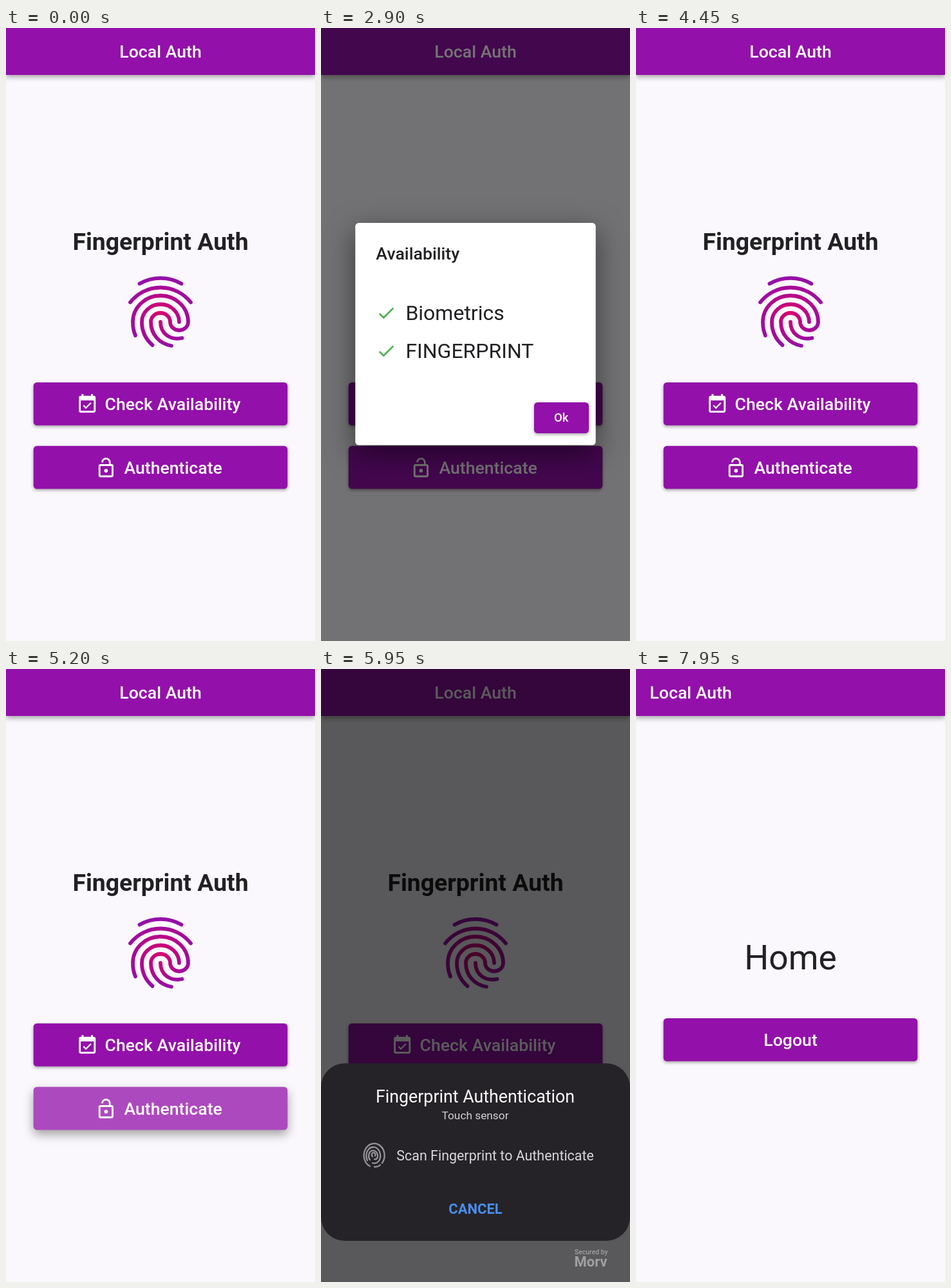
An HTML page with a canvas for the animation above (8 s loop, 480 by 953 pixels).

```html
<!DOCTYPE html>
<html lang="en">
<head>
<meta charset="utf-8">
<title>Local Auth</title>
<style>
  html, body { margin: 0; width: 100%; height: 100%; overflow: hidden; background: #faf8fc; }
  canvas { display: block; width: 480px; height: 953px; }
</style>
</head>
<body>
<canvas id="stage" width="480" height="953"></canvas>
<script>
const W = 480, H = 953, LOOP = 8000;
const PURPLE = '#9310aa', PAPER = '#faf8fc', INK = '#212023';
const stage = document.getElementById('stage').getContext('2d');
const buffer = Object.assign(document.createElement('canvas'), { width: W, height: H });
const bufferCtx = buffer.getContext('2d');
let ctx = stage;

const ICONS = {
  calendar: new Path2D('M16.53 11.06L15.47 10l-4.88 4.88-2.12-2.12-1.06 1.06L10.59 17l5.94-5.94zM19 3h-1V1h-2v2H8V1H6v2H5c-1.11 0-1.99.9-1.99 2L3 19c0 1.1.89 2 2 2h14c1.1 0 2-.9 2-2V5c0-1.1-.9-2-2-2zm0 16H5V8h14v11z'),
  lock: new Path2D('M12 17c1.1 0 2-.9 2-2s-.9-2-2-2-2 .9-2 2 .9 2 2 2zm6-9h-1V6c0-2.76-2.24-5-5-5S7 3.24 7 6h1.9c0-1.71 1.39-3.1 3.1-3.1s3.1 1.39 3.1 3.1v2H6c-1.1 0-2 .9-2 2v10c0 1.1.9 2 2 2h12c1.1 0 2-.9 2-2V10c0-1.1-.9-2-2-2zm0 12H6V10h12v10z'),
  check: new Path2D('M9 16.17L4.83 12l-1.42 1.41L9 19 21 7l-1.41-1.41z')
};

const FINGERPRINT = new Path2D(
  'M207.5 397.5A66 66 0 0 1 272.5 397.5 M193 426.5A59.5 59.5 0 0 1 287 426.5' +
  'M201 478C198 471 197 465 197 457A43 41 0 0 1 283 457A14 13 0 0 1 255 457' +
  'A15 14 0 0 0 225 457C225 477 239 491 257 494' +
  'M227.5 493C216 483 211 471 211 457A29 27.5 0 0 1 269 457' +
  'M240 457C240 475 255 486 273.5 482');

const SMALL_PRINT = new Path2D(
  'M95 768A16 18.5 0 1 0 76 773 M72 764A11 13.5 0 1 1 91 763Q87 770 80 768' +
  'M76 763A7 8.5 0 1 1 88 758Q87 763 83 762 M80 758A2.8 3.4 0 1 1 84 757 M83 774Q89 774 92 771');

const clamp = x => Math.min(1, Math.max(0, x));
const span = (t, start, length) => clamp((t - start) / length);

function bezier(x1, y1, x2, y2) {
  const at = (a, b, s) => 3 * a * s * (1 - s) ** 2 + 3 * b * s * s * (1 - s) + s ** 3;
  return x => {
    let lo = 0, hi = 1;
    for (let i = 0; i < 20; i++) {
      const mid = (lo + hi) / 2;
      if (at(x1, x2, mid) < x) lo = mid; else hi = mid;
    }
    return at(y1, y2, (lo + hi) / 2);
  };
}
const ease = bezier(0.25, 0.1, 0.25, 1);
const easeIn = bezier(0.42, 0, 1, 1);
const easeOut = bezier(0, 0, 0.58, 1);
const fastOutSlowIn = bezier(0.4, 0, 0.2, 1);

const press = (t, down, up) => span(t, down, 180) * (1 - span(t, up, 200));

function text(str, x, y, size, { weight = 400, color = '#fff', align = 'left' } = {}) {
  ctx.font = `${weight} ${size}px Roboto, sans-serif`;
  ctx.fillStyle = color;
  ctx.textAlign = align;
  ctx.fillText(str, x, y);
}

function box(x, y, w, h, r, color, shadow) {
  ctx.save();
  if (shadow) {
    ctx.shadowColor = `rgba(0,0,0,${shadow.alpha})`;
    ctx.shadowBlur = shadow.blur;
    ctx.shadowOffsetY = shadow.y;
  }
  ctx.fillStyle = color;
  ctx.beginPath();
  ctx.roundRect(x, y, w, h, r);
  ctx.fill();
  ctx.restore();
}

function icon(name, x, y, scale, color) {
  ctx.save();
  ctx.translate(x, y);
  ctx.scale(scale, scale);
  ctx.fillStyle = color;
  ctx.fill(ICONS[name]);
  ctx.restore();
}

function button(x, y, w, h, pressed = 0) {
  box(x, y, w, h, 5.3, PURPLE, { alpha: 0.36, blur: 5 + 11 * pressed, y: 2 + 5 * pressed });
  if (pressed) box(x, y, w, h, 5.3, `rgba(255,255,255,${0.24 * pressed})`);
}

function shade(alpha) {
  ctx.fillStyle = `rgba(0,0,0,${alpha})`;
  ctx.fillRect(0, 0, W, H);
}

// Draws a group off screen, then blends it as one picture.
function layer(draw, alpha, dy = 0) {
  bufferCtx.clearRect(0, 0, W, H);
  ctx = bufferCtx;
  draw();
  ctx = stage;
  ctx.globalAlpha = alpha;
  ctx.drawImage(buffer, 0, dy);
  ctx.globalAlpha = 1;
}

function scaffold(titleX, align) {
  ctx.fillStyle = PAPER;
  ctx.fillRect(0, 0, W, H);
  box(0, 0, W, 73, 0, PURPLE, { alpha: 0.36, blur: 8, y: 2.5 });
  text('Local Auth', titleX, 46, 26.67, { weight: 500, align });
}

function loginPage(t) {
  scaffold(240, 'center');
  text('Fingerprint Auth', 240, 345, 37.33, { weight: 700, color: INK, align: 'center' });

  const glow = ctx.createRadialGradient(240, 442, 0, 240, 442, 56);
  glow.addColorStop(0, '#d8006a');
  glow.addColorStop(1, PURPLE);
  ctx.strokeStyle = glow;
  ctx.lineWidth = 5.8;
  ctx.lineCap = ctx.lineJoin = 'round';
  ctx.stroke(FINGERPRINT);

  button(42.7, 551, 394.6, 66.7, press(t, 700, 900));
  icon('calendar', 108.8, 567.5, 1.45, '#fff');
  text('Check Availability', 153.6, 594.3, 26.67, { weight: 500 });

  button(42.7, 649.8, 394.6, 66.7, press(t, 5000, 5220));
  icon('lock', 138, 666.5, 1.45, '#fff');
  text('Authenticate', 183.4, 693, 26.67, { weight: 500 });
}

function homePage() {
  scaffold(21.3, 'left');
  text('Home', 240, 467, 53.33, { color: INK, align: 'center' });
  button(42.7, 543, 394.6, 66.7);
  text('Logout', 240, 586, 26.67, { weight: 500, align: 'center' });
}

function dialog(t) {
  box(53.3, 303, 373.4, 345.5, 5.3, '#fff', { alpha: 0.5, blur: 44, y: 14 });
  text('Availability', 85.3, 360, 26.67, { weight: 500, color: INK });
  [['Biometrics', 454], ['FINGERPRINT', 513]].forEach(([label, y]) => {
    icon('check', 85.3, y - 27, 1.333, '#4caf50');
    text(label, 131.4, y, 32, { color: INK });
  });
  button(331, 582, 85, 48, press(t, 3200, 3420));
  text('Ok', 373.3, 612.3, 18.67, { weight: 500, align: 'center' });
}

function sheet(dy) {
  ctx.save();
  ctx.translate(0, dy);
  box(0, 613, W, 276, 37, '#252327');
  text('Fingerprint Authentication', 239.5, 674, 26.8, { align: 'center', color: '#fafafa' });
  text('Touch sensor', 239.5, 700, 17.3, { align: 'center', color: '#d2d1d3' });
  ctx.strokeStyle = '#939294';
  ctx.lineWidth = 2.3;
  ctx.lineCap = 'round';
  ctx.stroke(SMALL_PRINT);
  text('Scan Fingerprint to Authenticate', 117.3, 764, 21.45, { color: '#d8d7d9' });
  text('CANCEL', 240, 847, 22, { weight: 700, align: 'center', color: '#4a8df0' });
  text('Secured by', 394, 909.5, 10.4, { weight: 500, color: '#a09fa1' });
  text('Morv', 393.5, 929, 22, { weight: 700, color: '#a09fa1' });
  ctx.restore();
}

function render(t) {
  loginPage(t);

  const shown = t < 2000 ? span(t, 950, 150) : 1 - span(t, 3417, 150);
  if (shown > 0 && t < 4000) {
    shade(0.54 * ease(shown));
    layer(() => dialog(t), easeOut(shown));
  }

  if (t >= 5500 && t < 7150) {
    shade(0.645 * span(t, 5500, 250));
    sheet(350 * (1 - easeOut(span(t, 5580, 330))));
  }

  const pushed = span(t, 7300, 300);
  if (pushed > 0) layer(homePage, easeIn(pushed), H * 0.25 * (1 - fastOutSlowIn(pushed)));
}

const began = performance.now();
function tick() {
  render((performance.now() - began) % LOOP);
  requestAnimationFrame(tick);
}
tick();
</script>
</body>
</html>
```
